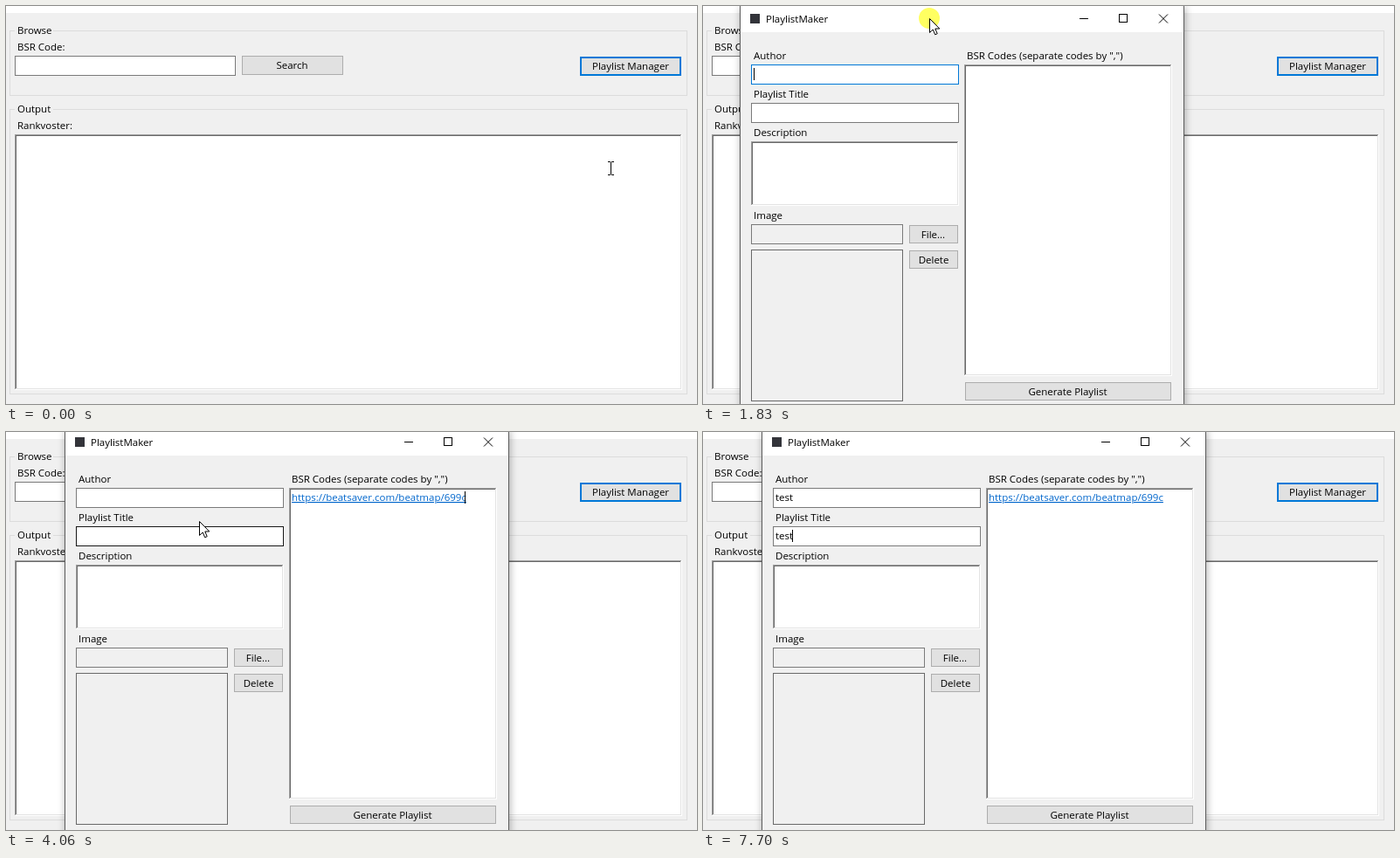
Animation, 791 px wide and 456 px high, one loop 8000 ms. Source, as an HTML page:

```html
<!DOCTYPE html>
<html lang="en">
<head>
<meta charset="utf-8">
<title>Playlist window</title>
<style>
html, body { margin: 0; width: 100%; height: 100%; overflow: hidden; background: #fff; }
svg { display: block; width: 791px; height: 456px; }
svg * { animation-duration: 8s; animation-timing-function: step-end; animation-iteration-count: infinite; }
text { font: 11.5px "Open Sans", "Noto Sans", sans-serif; white-space: pre; }
rect, .line { shape-rendering: crispEdges; }
.mid { text-anchor: middle; }
.line { fill: none; stroke: #dcdcdc; }
.field { fill: #fff; stroke: #7a7a7a; }
.off { fill: #f0f0f0; }
.btn { fill: #e1e1e1; stroke: #adadad; }
.white { fill: #fff; }
.s1 { stroke: #a0a0a0; }
.s2 { stroke: #696969; }
.s3 { stroke: #e3e3e3; }
.glyph { stroke: #000; }
.hide { opacity: 0; }

/* main button: hover, press, release */
#open { stroke: #0078d7; stroke-width: 2; animation-name: press; }
@keyframes press {
  2.5% { fill: #e5f1fb; } 5% { fill: #cce4f7; } 10.25% { fill: #e1e1e1; }
}

/* dialog: fades in slightly small, then is dragged */
#win { transform-origin: 321px 223px; animation-name: dialog; }
@keyframes dialog {
  0% { opacity: 0; }
  10.25% { opacity: .92; transform: translate(-50px, 7px) scale(.992); }
  12.875% { opacity: 1; transform: translate(-50px, 7px); }
  22.875% { transform: translate(-25px, 3px); opacity: 1; }
  25.375% { transform: none; opacity: 1; }
}
#frame { fill: #f0f0f0; stroke: #5c5c5c; filter: drop-shadow(1px 2px 4px rgba(0, 0, 0, .32)); }

/* field borders */
#author { animation-name: author; }
@keyframes author {
  0% { stroke: #0078d7; } 20.375% { stroke: #7a7a7a; } 22.875% { stroke: #0078d7; }
  40.625% { stroke: #7a7a7a; } 55.875% { stroke: #0078d7; } 83.75% { stroke: #7a7a7a; }
}
#edge { stroke: #0078d7; animation-name: edge; }
@keyframes edge { 20.375% { opacity: 1; } 22.875% { opacity: 0; } }
#title { animation-name: title; }
@keyframes title { 50.75% { stroke: #171717; } 53.375% { stroke: #7a7a7a; } }

/* typed text */
#link { fill: #0066cc; text-decoration: underline; animation-name: paste; }
@keyframes paste { 45.75% { opacity: 1; } }
#a1 { animation-name: a1; }
@keyframes a1 { 66% { opacity: 1; } }
#a2 { animation-name: a2; }
@keyframes a2 { 68.5% { opacity: 1; } }
#t1 { animation-name: t1; }
@keyframes t1 { 91.25% { opacity: 1; } }
#t2 { animation-name: t2; }
@keyframes t2 { 93.75% { opacity: 1; } }
#t3 { animation-name: t3; }
@keyframes t3 { 96.25% { opacity: 1; } }

/* one caret visits the three fields */
#caret { animation-name: caret; }
@keyframes caret {
  0% { transform: translate(83px, 68px); }
  20.375% { transform: translate(83px, 68px); opacity: 0; }
  22.875% { transform: translate(83px, 68px); opacity: 1; }
  40.625% { transform: translate(327px, 68px); }
  45.75% { transform: translate(525px, 68px); }
  55.875% { transform: translate(83px, 68px); }
  66% { transform: translate(93px, 68px); }
  68.5% { transform: translate(103px, 68px); }
  83.75% { transform: translate(83px, 112px); }
  91.25% { transform: translate(93px, 112px); }
  93.75% { transform: translate(99px, 112px); }
  96.25% { transform: translate(102px, 112px); opacity: 1; }
}

/* pointer */
#mouse { animation-name: mouse; }
@keyframes mouse {
  0% { transform: translate(692px, 186px); }
  2.5% { transform: translate(697px, 77px); }
  10.25% { transform: translate(574px, 48px); }
  12.875% { transform: translate(500px, 42px); }
  15.25% { transform: translate(350px, 29px); }
  17.75% { transform: translate(234px, 18px); }
  22.875% { transform: translate(259px, 14px); }
  25.375% { transform: translate(284px, 11px); }
  30.5% { transform: translate(330px, 50px); }
  33% { transform: translate(385px, 100px); }
  35.625% { transform: translate(419px, 133px); opacity: 1; }
  45.75% { transform: translate(419px, 133px); opacity: 0; }
  48.25% { transform: translate(320px, 118px); opacity: 1; }
  50.75% { transform: translate(221px, 102px); }
  53.375% { transform: translate(182px, 80px); opacity: 1; }
  66% { transform: translate(182px, 80px); opacity: 0; }
  76.125% { transform: translate(182px, 80px); opacity: 1; }
  78.625% { transform: translate(180px, 98px); }
  81.125% { transform: translate(178px, 129px); }
  83.75% { transform: translate(178px, 124px); opacity: 1; }
  91.25% { transform: translate(178px, 124px); opacity: 0; }
}
#arrow { animation-name: arrow; }
@keyframes arrow {
  0% { opacity: 0; } 2.5% { opacity: 1; } 33% { opacity: 0; } 50.75% { opacity: 1; }
  53.375% { opacity: 0; } 78.625% { opacity: 1; } 83.75% { opacity: 0; }
}
#beam { animation-name: beam; }
@keyframes beam {
  0% { opacity: 1; } 2.5% { opacity: 0; } 33% { opacity: 1; } 50.75% { opacity: 0; }
  53.375% { opacity: 1; } 78.625% { opacity: 0; } 83.75% { opacity: 1; }
}
#click { animation-name: click; }
@keyframes click {
  0% { opacity: 0; } 5% { opacity: 1; } 10.25% { opacity: 0; }
  20.375% { opacity: 1; } 27.875% { opacity: 0; }
  38.125% { opacity: 1; } 40.625% { opacity: 0; }
  55.875% { opacity: 1; } 58.5% { opacity: 0; }
  83.75% { opacity: 1; } 86.25% { opacity: 0; }
}
</style>
</head>
<body>
<svg viewBox="0 0 791 456">
  <rect y="8" width="791" height="448" fill="#f0f0f0"/>
  <path class="line" d="M10 28.5H4.5V102.5H779.5V28.5H54M10 118.5H4.5V444.5H779.5V118.5H54"/>
  <text x="13" y="32">Browse</text>
  <text x="13" y="51">BSR Code:</text>
  <rect class="field" x="10.5" y="57.5" width="252" height="22"/>
  <rect class="btn" x="270.5" y="57.5" width="115" height="21"/>
  <text class="mid" x="327.5" y="72">Search</text>
  <rect class="btn" id="open" x="658" y="59" width="114" height="20"/>
  <text class="mid" x="715" y="73">Playlist Manager</text>
  <text x="13" y="122">Output</text>
  <text x="13" y="141">Rankvoster:</text>
  <rect class="white" x="10" y="147" width="764" height="293"/>
  <path class="line s1" d="M10.5 439V147.5H773"/>
  <path class="line s2" d="M11.5 438V148.5H772"/>
  <path class="line s3" d="M772.5 148V438.5H11"/>

  <g id="win">
    <rect id="frame" x="67.5" y="-3.5" width="508" height="500"/>
    <rect class="white" x="68" y="-3" width="507" height="30"/>
    <rect x="79" y="6" width="11" height="11" fill="#33343a"/>
    <text x="97" y="16">PlaylistMaker</text>
    <path class="line glyph" d="M456 11.5H466M501.500 6.500H510.500V15.500H501.500Z"/>
    <path class="glyph" d="M547 6.500L557 16.500M557 6.500L547 16.500"/>

    <text x="83" y="58">Author</text>
    <rect class="field" id="author" x="80.5" y="64.5" width="237" height="22"/>
    <path class="line hide" id="edge" d="M80.5 64V87"/>
    <text x="83" y="102">Playlist Title</text>
    <rect class="field" id="title" x="80.5" y="108.5" width="237" height="22"/>
    <text x="83" y="146">Description</text>
    <rect class="white" x="80" y="152" width="238" height="74"/>
    <path class="line s1" d="M80.5 225V152.5H317"/>
    <path class="line s2" d="M81.5 224V153.5H316"/>
    <path class="line s3" d="M316.5 153V224.5H81"/>
    <text x="83" y="241">Image</text>
    <rect class="field off" x="80.5" y="247.5" width="173" height="22"/>
    <rect class="field off s2" x="80.5" y="276.5" width="173" height="173"/>
    <rect class="btn" x="261.5" y="248.5" width="55" height="20"/>
    <text class="mid" x="288.5" y="263">File...</text>
    <rect class="btn" x="261.5" y="277.5" width="55" height="20"/>
    <text class="mid" x="289" y="292">Delete</text>

    <text x="327" y="58">BSR Codes (separate codes by ",")</text>
    <rect class="white" x="324" y="64" width="238" height="357"/>
    <path class="line s1" d="M324.5 420V64.5H561"/>
    <path class="line s2" d="M325.5 419V65.5H560"/>
    <path class="line s3" d="M560.5 65V419.5H325"/>
    <rect class="btn" x="325.5" y="428.5" width="235" height="20"/>
    <text class="mid" x="442.5" y="443">Generate Playlist</text>

    <text class="hide" id="link" x="327" y="79">https://beatsaver.com/beatmap/699c</text>
    <text class="hide" id="a1" x="83" y="79">te</text>
    <text class="hide" id="a2" x="93.500" y="79">st</text>
    <text class="hide" id="t1" x="83" y="123">te</text>
    <text class="hide" id="t2" x="93.500" y="123">s</text>
    <text class="hide" id="t3" x="99" y="123">t</text>
    <rect id="caret" width="1" height="14"/>
  </g>

  <g id="mouse">
    <circle id="click" r="12" fill="#ffff00" fill-opacity=".62"/>
    <path id="arrow" d="M.5 .5V16.500L4.200 13L6.700 18.800L9.200 17.700L6.800 12H11.800Z" fill="#fff" stroke="#000"/>
    <path id="beam" class="line glyph" d="M-3 -7.500H0M1 -7.500H4M-3 7.500H0M1 7.500H4M.5 -7V7"/>
  </g>
</svg>
</body>
</html>
```
